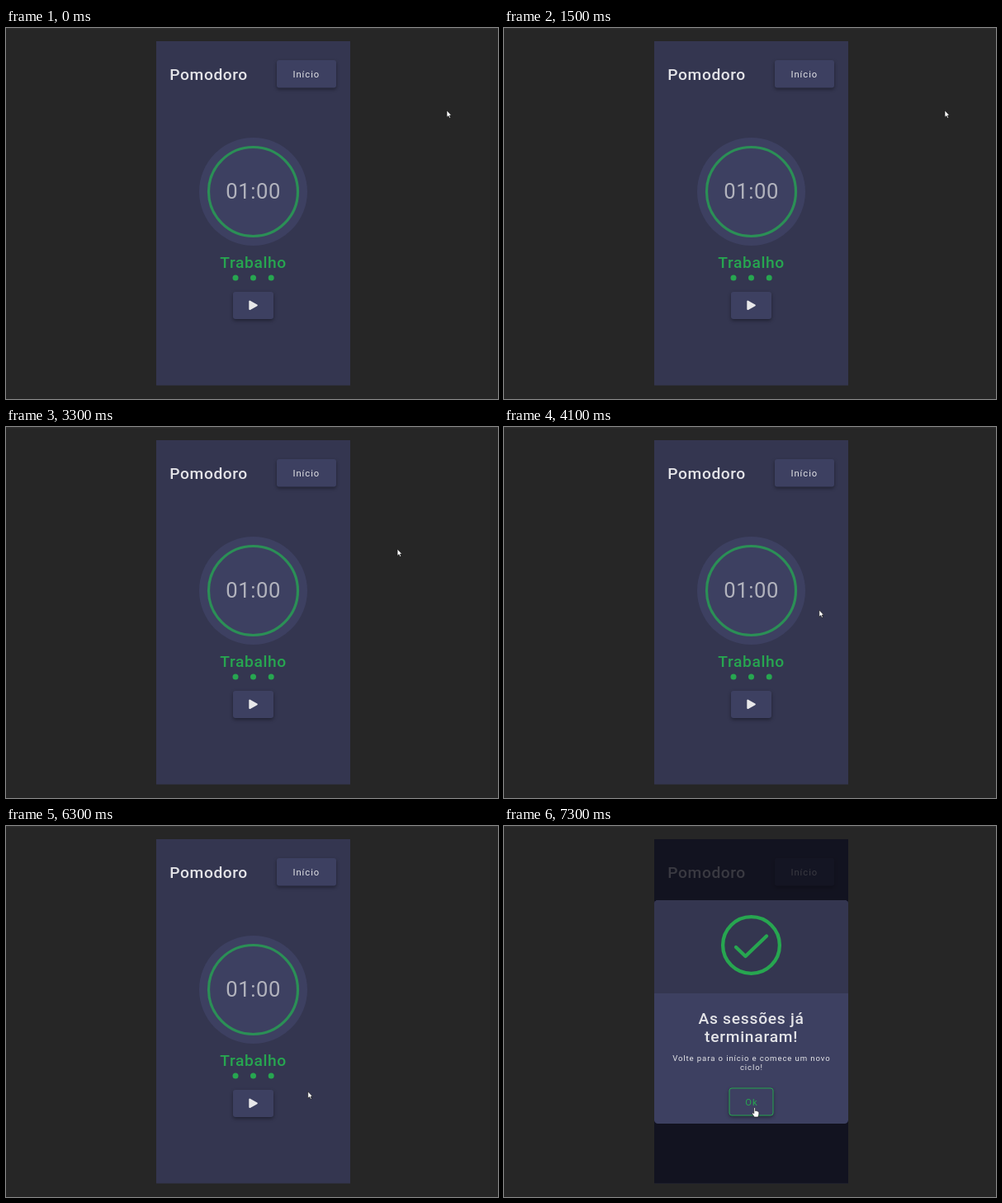
Recreate the animation shown at these times as an HTML page. Size 596 px wide and 450 px high, loop 8 s.

```html
<!DOCTYPE html>
<html lang="pt">
<head>
<meta charset="utf-8">
<title>Pomodoro</title>
<style>
  html, body { margin: 0; width: 100%; height: 100%; overflow: hidden; background: #262626; }
  svg { display: block; }
  text { font-family: Roboto, sans-serif; fill: #e4e4e8; }
  .title { font-size: 19.2px; font-weight: 500; letter-spacing: .6px; }
  .label { font-size: 11.2px; letter-spacing: .95px; }
  .clock { font-size: 25.6px; letter-spacing: .6px; fill: #b2b3bd; }
  .heading { font-size: 19.2px; font-weight: 500; letter-spacing: .75px; }
  .note { font-size: 9.6px; letter-spacing: .89px; }
  .green { fill: #27a650; }
  .button { fill: #3d4061; filter: drop-shadow(0 2px 2px rgba(0, 0, 0, .38)); }
  .button.hover { fill: #373955; }
  .middle { text-anchor: middle; }
</style>
</head>
<body>
<svg width="596" height="450" viewBox="0 0 596 450">
  <rect width="596" height="450" fill="#262626"/>
  <rect width="596" height="1.5" fill="#2e2e2e"/>
  <rect x="182" y="16" width="235" height="417.5" fill="#343650"/>

  <text class="title" x="198.3" y="62.5">Pomodoro</text>
  <rect class="button" x="328" y="39" width="72" height="33.5" rx="3"/>
  <text class="label" x="347.5" y="60">Início</text>

  <g id="timer">
    <circle cx="299.5" cy="198.5" r="65.5" fill="#3d4061"/>
    <circle cx="299.5" cy="198.5" r="54" fill="none" stroke="#2b8f56" stroke-width="3.2"/>
    <text class="clock middle" x="299.6" y="207.3">01:00</text>
    <text class="title green middle" x="299.5" y="291">Trabalho</text>
    <g class="green">
      <circle cx="278" cy="303" r="3.5"/>
      <circle cx="299.5" cy="303" r="3.5"/>
      <circle cx="321.2" cy="303" r="3.5"/>
    </g>
    <rect id="play" class="button" x="275" y="320" width="49" height="33" rx="3"/>
    <path id="playIcon" d="M295.3 331.5V341L303.8 336.3Z" stroke-width="2" stroke-linejoin="round"/>
  </g>

  <g id="dialog">
    <rect x="182" y="16" width="235" height="417.5" fill="#0a0a12" opacity=".78"/>
    <rect x="182" y="90" width="235" height="271" rx="4.5" fill="#3d4061"/>
    <path d="M182 203V94.5a4.5 4.5 0 0 1 4.5-4.5h226a4.5 4.5 0 0 1 4.5 4.5V203Z" fill="#343650"/>
    <g fill="none" stroke="#27a650" stroke-width="4.3" stroke-linecap="round" stroke-linejoin="round">
      <circle cx="299.5" cy="144.5" r="34.4"/>
      <path d="M281 147L292.5 158L318 133.5"/>
    </g>
    <g class="middle">
      <text class="heading" x="299.6" y="239.5">As sessões já</text>
      <text class="heading" x="299.6" y="262">terminaram!</text>
      <text class="note" x="299.9" y="284.7">Volte para o início e comece um novo</text>
      <text class="note" x="299.9" y="296">ciclo!</text>
      <rect class="button" x="273" y="318" width="53" height="33" rx="3" stroke="#27a650"/>
      <text class="label green" x="300" y="338.5">Ok</text>
    </g>
  </g>

  <g id="cursor" fill="#fff" stroke="#111" stroke-width=".6" stroke-linejoin="round">
    <path id="arrow" d="M0 0V8.2L1.9 6.6L3.2 9.3L4.5 8.7L3.3 6H5.6Z"/>
    <path id="hand" d="M-.8 .6Q0 -.6 .8 .6V4Q1.7 3.4 2.3 4.3Q3.2 3.8 3.8 4.7Q5.2 4.4 5.2 6V8.3L4.2 11.5H-.4L-3 7.4Q-3 6 -1.8 6.4L-.8 7.2Z"/>
  </g>
</svg>
<script>
  const LOOP = 8000, STEP = 100, DIALOG_AT = 7300;
  const $ = id => document.getElementById(id);
  const show = (id, visible) => $(id).setAttribute('display', visible ? 'inline' : 'none');
  const ease = p => p * p * (3 - 2 * p);

  const start = [534, 100];
  const moves = [
    { from: 3000, to: 3700, at: [381.8, 222] },
    { from: 4700, to: 4800, at: [461.5, 292] },
    { from: 5900, to: 6600, at: [303.6, 341.5] }
  ];

  function pointerAt(time) {
    let [x, y] = start;
    for (const { from, to, at } of moves) {
      const p = ease(Math.min(1, Math.max(0, (time - from) / (to - from))));
      x += (at[0] - x) * p;
      y += (at[1] - y) * p;
    }
    return [x, y];
  }

  function render(ms) {
    // The screen refreshes ten times a second.
    const time = Math.floor(ms / STEP) * STEP;
    const [x, y] = pointerAt(time);
    const over = x > 275 && x < 324 && y > 320 && y < 353;
    const done = time >= DIALOG_AT;

    $('cursor').setAttribute('transform', `translate(${x} ${y})`);
    show('arrow', !over);
    show('hand', over);
    $('play').classList.toggle('hover', over);
    const iconColor = over ? '#cfd0cc' : '#e8e8ea';
    $('playIcon').setAttribute('fill', iconColor);
    $('playIcon').setAttribute('stroke', iconColor);
    show('timer', !done);
    show('dialog', done);
  }

  const origin = performance.now();
  function tick() {
    render((performance.now() - origin) % LOOP);
    requestAnimationFrame(tick);
  }
  tick();
</script>
</body>
</html>
```
